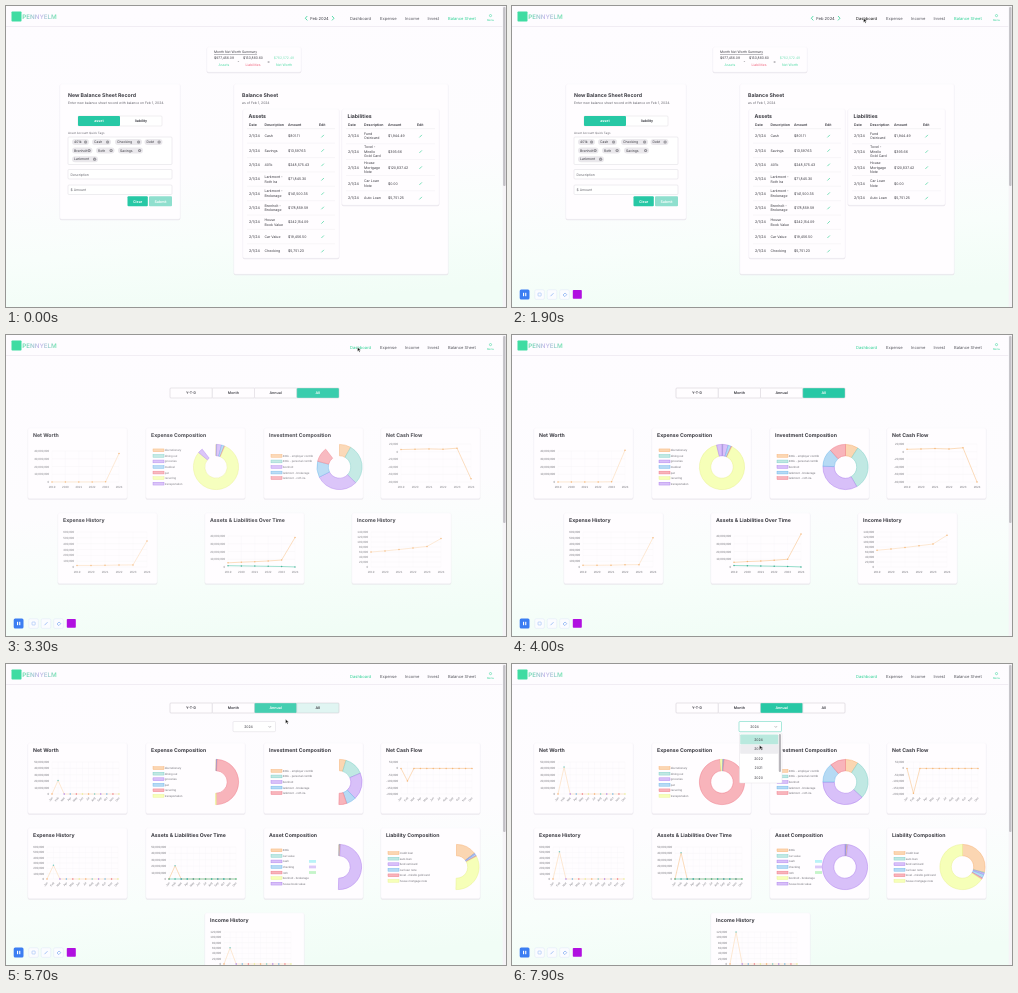
An HTML page that plays this animation: 500x301 px, repeating every 8000 ms.

```html
<!DOCTYPE html>
<html lang="en">
<head>
<meta charset="utf-8">
<title>Budget dashboard</title>
<style>
html, body { margin: 0; width: 100%; height: 100%; overflow: hidden; background: #fdfbfe; }
svg { display: block; width: 500px; height: 301px; }
text { font-family: Inter, sans-serif; text-rendering: geometricPrecision; white-space: pre; }
.tick { font-family: "Liberation Sans", sans-serif; }
</style>
</head>
<body>
<svg viewBox="0 0 500 301">
  <defs>
    <linearGradient id="bg" x1="0.35" y1="0" x2="0.5" y2="1">
      <stop offset="0" stop-color="#fefcff"/><stop offset=".55" stop-color="#fdfcfe"/>
      <stop offset=".78" stop-color="#f8fefb"/><stop offset="1" stop-color="#f1fdf6"/>
    </linearGradient>
    <linearGradient id="word">
      <stop offset="0" stop-color="#58dfa4"/><stop offset=".5" stop-color="#cdb8ee"/>
      <stop offset="1" stop-color="#6fe5ae"/>
    </linearGradient>
  </defs>
  <rect width="500" height="301" fill="url(#bg)"/>
  <g id="sheet"></g>
  <g id="all"><g></g><g></g></g>
  <g id="year"><g></g><g></g></g>
  <g id="head"></g>
  <g id="tools"></g>
  <g id="top"></g>
</svg>
<script>
const LOOP = 8000, TEAL = '#27c8a5', GREEN = '#2fd295', INK = '#3b3b42';
const MONTHS = 'Jan Feb Mar Apr May Jun Jul Aug Sep Oct Nov Dec'.split(' ');
const YEARS = [2019, 2020, 2021, 2022, 2023, 2024];
// each colour: fill, outline
const PALETTE = {
  o: ['#fbd6b2', '#f7ab68'], t: ['#c0e8e3', '#74cbc3'], p: ['#d8c0f9', '#a878ea'],
  b: ['#b6daf4', '#62b1e8'], r: ['#f8b4bb', '#ee7080'], y: ['#f6ffb8', '#e6f08a']
};
const $ = id => document.getElementById(id);
const clamp = v => Math.max(0, Math.min(1, v));
const ramp = (t, from, to) => clamp((t - from) / (to - from));
const easeOut = p => 1 - (1 - p) ** 4;

const text = (x, y, s, size = 3.4, fill = INK, more = '') =>
  `<text x="${x}" y="${y}" font-size="${size}" fill="${fill}" ${more}>${s}</text>`;
const mid = (x, y, s, size, fill, more = '') => text(x, y, s, size, fill, 'text-anchor="middle" ' + more);
const bold = (x, y, s, size = 5.2) => text(x, y, s, size, INK, 'font-weight="700"');
const rect = (x, y, w, h, fill, r = 0, stroke = 'none', more = '') =>
  `<rect x="${x}" y="${y}" width="${w}" height="${h}" rx="${r}" fill="${fill}" stroke="${stroke}" stroke-width=".4" ${more}/>`;
const path = (d, stroke, w = .5, fill = 'none') =>
  `<path d="${d}" stroke="${stroke}" stroke-width="${w}" fill="${fill}" stroke-linejoin="round"/>`;
const card = (x, y, w, h) =>
  rect(x - .3, y + .5, w + .6, h + .7, '#e6e2e9', 1.6, 'none', 'opacity=".75"') + rect(x, y, w, h, '#fffdff', 1.4, '#f4f1f6');

// ---- balance sheet page ----
function table(x, w, h, title, rows, cols) {
  const [desc, amount, edit] = cols;
  let s = card(x, 103, w, h) + bold(x + 5.5, 112, title);
  [['Date', x + 6], ['Description', desc], ['Amount', amount], ['Edit', edit]]
    .forEach(([label, cx]) => s += text(cx, 120, label, 3.5, INK, 'font-weight="600"'));
  s += path(`M${x + 4} 122.7h${w - 8}`, '#e6e3e9', .4);
  rows.forEach(([y, name, sum], i) => {
    const lines = name.split('|');
    s += text(x + 6, y + 1.2, '2/1/24', 3.6) + text(amount, y + 1.2, '$' + sum, 3.5);
    lines.forEach((l, k) => s += text(desc, y + 1.2 + (k - (lines.length - 1) / 2) * 4.5, l, 3.5));
    s += path(`M${edit + 2.4} ${y + 1.4}l2.5 -2.5`, '#55d8a6', .8);
    if (rows[i + 1]) s += path(`M${x + 4} ${(y + rows[i + 1][0]) / 2}h${w - 8}`, '#eeebf0', .4);
  });
  return s;
}

function sheetPage() {
  let s = path('M301.3 10l-2 2.2 2 2.2M326 10l2 2.2 -2 2.2', GREEN, .8) + mid(313.5, 13.6, 'Feb 2024', 4.1, INK);
  s += card(201, 41, 94, 25) + text(208, 47.2, 'Month Net Worth Summary', 3.35, INK, 'text-decoration="underline"');
  [[218, '$977,456.09', 'Assets', INK, '#4fdba5'], [247, '$133,883.60', 'Liabilities', INK, '#f0647c'],
   [278, '$782,572.49', 'Net Worth', '#7fe3bb', '#4fdba5']].forEach(([x, sum, label, c1, c2]) =>
    s += mid(x, 53.2, sum, 3.4, c1) + mid(x, 59.8, label, 3.4, c2));
  s += mid(232.3, 57, '-', 4, INK) + mid(262.5, 57, '=', 4, INK);

  s += card(54, 78, 120, 135) + bold(62, 91.2, 'New Balance Sheet Record');
  s += text(62, 97.8, 'Enter new balance sheet record with balance on Feb 1, 2024.', 3.35, '#66666e');
  s += rect(72, 110, 84, 10, '#fff', 1, '#d9d6dc') + rect(72, 110, 42, 10, TEAL, 1);
  s += mid(93, 116.3, 'asset', 3.6, '#fff', 'font-weight="600"') + mid(135, 116.3, 'liability', 3.6, INK, 'font-weight="600"');
  s += text(62, 128.3, 'Asset Account Quick Tags', 2.95, '#66666e') + rect(62, 131, 104, 27.5, '#fff', 1, '#d5d2d8');
  [[66, 136, 17, '401k'], [86, 136, 19, 'Cash'], [109, 136, 27, 'Checking'], [138.5, 136, 18, 'Debt'],
   [66, 144.5, 20.5, 'Brenholt'], [90, 144.5, 18.5, 'Roth'], [112, 144.5, 25, 'Savings'], [66, 153.2, 26, 'Larkmont']]
    .forEach(([x, y, w, tag]) => {
      const cx = x + w - 3.4;
      s += rect(x, y - 3, w, 6, '#eae8ec', 3) + text(x + 2, y + 1.2, tag, 3.4);
      s += `<circle cx="${cx}" cy="${y}" r="1.6" fill="#8d8b92"/>` + path(`M${cx - .6} ${y - .6}l1.2 1.2m0 -1.2l-1.2 1.2`, '#fff', .4);
    });
  s += rect(62, 163.5, 104, 9.5, '#fff', 1, '#d5d2d8') + text(64.5, 169.5, 'Description', 3.4, '#66666e');
  s += rect(62, 179, 104, 9.5, '#fff', 1, '#d5d2d8') + text(64.5, 185, '$ Amount', 3.4, '#66666e');
  s += rect(121.5, 190.3, 20.3, 10, TEAL, 1) + mid(131.6, 196.6, 'Clear', 3.6, '#fff', 'font-weight="600"');
  s += rect(143, 190.3, 23, 10, '#8fdfce', 1) + mid(154.5, 196.6, 'Submit', 3.6, '#fff', 'font-weight="600"');

  s += card(228, 78, 214, 190) + bold(236, 91.2, 'Balance Sheet') + text(236, 97.8, 'as of Feb 1, 2024', 3.4, '#66666e');
  const assets = [['Cash', '801.11'], ['Savings', '13,597.63'], ['401k', '248,575.43'], ['Larkmont -|Roth Ira', '71,845.30'],
    ['Larkmont -|Brokerage', '141,500.35'], ['Brenholt -|Brokerage', '178,859.59'], ['House|Book Value', '242,154.09'],
    ['Car Value', '19,456.50'], ['Checking', '5,751.23']].map((r, i) => [130 + i * 14.37, ...r]);
  s += table(237, 96, 149, 'Assets', assets, [258.5, 282, 313]);
  s += table(336, 97, 96, 'Liabilities', [[130, 'Fund|Ostricard', '1,944.49'], [145.5, 'Tovel -|Mirello|Gold Card', '393.66'],
    [161.5, 'House|Mortgage|Note', '120,837.42'], [177.5, 'Car Loan|Note', '0.00'], [192, 'Auto Loan', '5,751.25']], [358, 382, 411]);
  return s;
}

// ---- charts ----
const line = (x, y, title, [lo, hi, step], top, [x0, x1], ...series) => ({ x, y, title, lo, hi, step, top, x0, x1, series });
const ring = (x, y, title, cx, parts) => ({ x, y, title, cx, parts });
const peak = v => MONTHS.map((m, i) => i === 1 ? v : 0);
const invest = [['o', '401k - employer contrib'], ['t', '401k - personal contrib'], ['p', 'brenholt'],
  ['b', 'larkmont - brokerage'], ['r', 'larkmont - roth ira']];
const withSizes = (parts, sizes) => parts.map((p, i) => [...p, sizes[i]]);

// money in thousands
const allCharts = [
  line(22, 93, 'Net Worth', [0, 4e4, 1e4], 23, [24, 91], [100, 100, 100, 100, 300, 41000]),
  ring(140, 93, 'Expense Composition', 70, [['o', 'discretionary', 1], ['t', 'dining out', 1], ['p', 'groceries', 14],
    ['b', 'medical', 8], ['r', 'pet', 2], ['y', 'recurring', 320], ['p', 'transportation', 14]]),
  ring(258, 93, 'Investment Composition', 75.5, withSizes(invest, [33, 117, 122, 46, 42])),
  line(375, 93, 'Net Cash Flow', [-80, 20, 20], 16, [20, 90], [6, 7, 8, 7, 10, -80]),
  line(52, 178, 'Expense History', [0, 600, 100], 19, [19, 89], [30, 30, 32, 38, 40, 500]),
  line(199, 178, 'Assets &amp; Liabilities Over Time', [0, 4e4, 1e4], 23, [23, 90],
    [6000, 7000, 7700, 8700, 10000, 42500], [1900, 1600, 1300, 1000, 700, 100]),
  line(346, 178, 'Income History', [0, 140, 20], 19, [19, 89], [67, 72, 78, 85, 92, 127])
];
const yearCharts = [
  line(22, 79, 'Net Worth', [0, 5e4, 1e4], 19, [24, 91], peak(42000)),
  ring(140, 79, 'Expense Composition', 70, [['o', 'discretionary', 2], ['t', 'dining out', 1], ['p', 'groceries', 1],
    ['b', 'pet', 1], ['r', 'recurring', 350], ['y', 'transportation', 5]]),
  ring(258, 79, 'Investment Composition', 75.5, withSizes(invest, [33, 100, 137, 50, 40])),
  line(375, 79, 'Net Cash Flow', [-200, 50, 50], 19, [20, 91], peak(-195)),
  line(22, 164, 'Expense History', [0, 600, 100], 19, [19, 90], peak(510)),
  line(140, 164, 'Assets &amp; Liabilities Over Time', [0, 5e4, 1e4], 19, [23, 90], peak(41000), peak(0)),
  ring(258, 164, 'Asset Composition', 75, [['o', '401k', 1], ['t', 'car value', 1], ['p', 'cash', 1], ['b', 'checking', 2],
    ['r', 'roth', 1], ['y', 'brenholt - brokerage', 1], ['p', 'house book value', 353]]),
  ring(375, 164, 'Liability Composition', 75.5, [['o', 'credit loan', 104], ['t', 'auto loan', 2], ['p', 'fund ostricard', 4],
    ['b', 'car loan note', 9], ['r', 'tovel - mirello gold card', 4], ['y', 'house mortgage note', 237]]),
  line(199, 249, 'Income History', [0, 120, 20], 19, [19, 86], peak(120))
];

// pixel geometry of a line chart
function scale(c) {
  const n = c.series[0].length, base = c.y + (n === 12 ? 51 : 54), top = c.y + c.top;
  return {
    n, base, top,
    px: i => c.x + c.x0 + i * (c.x1 - c.x0) / (n - 1),
    py: v => base - (v - c.lo) / (c.hi - c.lo) * (base - top)
  };
}

function frameOf(c) {
  let s = card(c.x, c.y, 99, 70.5) + bold(c.x + 5, c.y + 9.2, c.title);
  if (c.parts) {
    c.parts.forEach(([col, label], i) => {
      const y = c.y + 39 + (i - (c.parts.length - 1) / 2) * 5.55;
      s += rect(c.x + 7, y - 1.4, 11, 2.8, PALETTE[col][0], 0, PALETTE[col][1]);
      s += text(c.x + 18.8, y + 1, label, 2.9, '#6f6f76', 'class="tick"');
    });
    if (c.title === 'Asset Composition')
      ['#b9f3f7', '#dcc9f8', '#c5f4c9'].forEach((f, i) => s += rect(303, 196 + i * 5.55, 7, 2.8, f));
    return s;
  }
  const { n, base, top, px, py } = scale(c), tick = 'class="tick" text-anchor="end"';
  for (let v = c.lo; v <= c.hi; v += c.step) {
    s += path(`M${px(0)} ${py(v)}H${px(n - 1)}`, '#f0edf2', .3);
    s += text(px(0) - 2.8, py(v) + 1, (v * 1000).toLocaleString('en-US'), 3, '#77777d', tick);
  }
  for (let i = 0; i < n; i++) {
    const x = px(i);
    s += path(`M${x} ${top}V${base}`, '#f5f3f7', .3);
    s += n === 12
      ? text(x + 1, base + 4, MONTHS[i], 2.8, '#77777d', `${tick} transform="rotate(-50 ${x + 1} ${base + 4})"`)
      : mid(x, base + 6, YEARS[i], 3, '#77777d', 'class="tick"');
  }
  return s;
}

function dataOf(c, p) {
  if (p <= 0) return '';
  let s = '';
  if (c.parts) {
    const cx = c.x + c.cx, cy = c.y + 39, R = 22.6, r = 11.2;
    const at = (a, rad) => `${cx + rad * Math.sin(a)} ${cy - rad * Math.cos(a)}`;
    let a = 0;
    for (const [col, , deg] of c.parts) {
      const b = a + deg * p * Math.PI / 180, big = +(b - a > Math.PI);
      s += path(`M${at(a, R)}A${R} ${R} 0 ${big} 1 ${at(b, R)}L${at(b, r)}A${r} ${r} 0 ${big} 0 ${at(a, r)}Z`,
        PALETTE[col][1], .45, PALETTE[col][0]);
      a = b;
    }
    return s;
  }
  const { px, py } = scale(c), strong = c.series[1] || c.lo < 0, hues = Object.values(PALETTE);
  c.series.forEach((vals, k) => {
    const color = k ? '#4fc9a9' : strong ? '#f9c48d' : '#fbdab5';
    s += path('M' + vals.map((v, i) => `${px(i)} ${py(v * p)}`).join('L'), color, .6);
    vals.forEach((v, i) => {
      const dot = k ? '#3fae93' : vals.length === 12 && c.lo === 0 ? hues[i % 6][1] : '#f5b779';
      s += `<circle cx="${px(i)}" cy="${py(v * p)}" r=".75" fill="${dot}"/>`;
    });
  });
  return s;
}

// period switch; on = strength of the green for each cell
function segments(y, on) {
  let s = rect(164, y, 169, 10, '#fffdff', 1, '#d9d5dc');
  ['Y-T-D', 'Month', 'Annual', 'All'].forEach((label, i) => {
    const x = 164 + i * 42.25;
    s += rect(x, y, 42.25, 10, TEAL, 1, '#d9d5dc', `fill-opacity="${on[i]}"`);
    s += mid(x + 21.1, y + 6.3, label, 3.6, on[i] > .5 ? '#fff' : INK, 'font-weight="600"');
  });
  return s;
}

function select(t) {
  const open = t >= 7400;
  let s = rect(227, 57.5, 42.5, 10.2, '#fff', 1, t >= 7300 ? TEAL : '#d5d2d8') + mid(242.5, 63.9, '2024', 3.5, INK);
  s += path('M262.6 62.2l1.2 1.2 1.2 -1.2', '#77777d', .5);
  if (!open) return s;
  s += rect(227.5, 69, 42.5, 50, '#fff', 1, '#dedbe1') + rect(228.2, 70.5, 38, 10, '#b9e9de', .8);
  if (cursorAt(t)[1] > 80) s += rect(228.2, 80.5, 38, 9.2, '#ededf0', .8);
  for (let i = 0; i < 5; i++) s += mid(246.5, 76.8 + i * 9.5, 2024 - i, 3.5, INK);
  return s + rect(266.8, 70, 2.2, 38, '#b9b7bc', 1);
}

// ---- header, toolbar, pointer ----
function header(t) {
  const onSheet = t < 2500;
  let s = path('M0 20.5H496.5', '#e9e5ec', .6) + rect(5.5, 5.5, 10, 10, '#3fdca2', .8);
  s += text(16.3, 13, 'PENNYELM', 6.2, 'url(#word)', 'font-weight="600"');
  [['Dashboard', 344], ['Expense', 374], ['Income', 399], ['Invest', 421.5], ['Balance Sheet', 442]].forEach(([label, x], i) => {
    const active = i === (onSheet ? 4 : 0), hover = i === 0 && onSheet && t > 1600;
    s += text(x, 13.7, label, 4.1, active ? GREEN : hover ? '#111' : '#55555c');
  });
  s += `<circle cx="484.5" cy="9.6" r="1.1" fill="none" stroke="${GREEN}" stroke-width=".5"/>` + mid(484.5, 14.6, 'Menu', 2.6, GREEN);
  const thumb = t < 2600 ? 179 : t < 5400 ? 187 : 167;
  return s + rect(496.6, 0, 3.4, 301, '#f6f4f7') + rect(497.1, 1, 2.4, thumb, '#c3c1c6', 1);
}

function toolbar() {
  let s = rect(7.7, 283.5, 9.8, 10, '#3b7df2', 1.5) + rect(11, 286.8, 1.1, 3.4, '#fff') + rect(13.2, 286.8, 1.1, 3.4, '#fff');
  [22.8, 35.2, 47.7].forEach(x => s += rect(x, 283.8, 9.6, 9.6, '#fbfcff', 1.4, '#d6e2f6'));
  s += rect(26, 287, 3.2, 3, 'none', .6, '#6c9cf0');
  s += path('M38.5 290.2l3 -3M51 289l2 -2 1.8 1.6 -2 2z', '#6c9cf0', .6);
  return s + rect(60.8, 284, 9, 8.8, '#b010e0', .8);
}

const TRAIL = [[800, 66, 288], [1650, 352, 14], [4400, 352, 14], [5200, 274, 58], [5500, 280, 57], [6300, 280, 57],
  [6500, 277, 58], [7150, 277, 58], [7350, 256, 63], [7450, 256, 63], [7800, 248, 83], [8000, 248, 83]];
function cursorAt(t) {
  const i = Math.max(1, TRAIL.findIndex(k => k[0] > t)), [a, ax, ay] = TRAIL[i - 1], [b, bx, by] = TRAIL[i];
  const p = ramp(t, a, b), e = p * p * (3 - 2 * p);
  return [ax + (bx - ax) * e, ay + (by - ay) * e];
}
function pointer(t) {
  if (t < 800 || t > 3500 && t < 4400) return '';
  const [x, y] = cursorAt(t);
  return path(`M${x - .5} ${y - 1.8}v4.4l1.1 -1 .7 1.6 .8 -.4 -.7 -1.5h1.5z`, '#fff', .4, '#111');
}

function show(id, opacity) {
  $(id).style.display = opacity > 0 ? '' : 'none';
  $(id).style.opacity = opacity;
}

$('sheet').innerHTML = sheetPage();
$('tools').innerHTML = toolbar();
$('all').firstChild.innerHTML = allCharts.map(frameOf).join('');
$('year').firstChild.innerHTML = yearCharts.map(frameOf).join('');

function draw() {
  const t = performance.now() % LOOP, annual = t >= 5400;
  const fill = easeOut(annual ? ramp(t, 5540, 6540) : ramp(t, 2870, 3870));
  show('sheet', 1 - ramp(t, 2550, 2720));
  show('all', annual ? 0 : ramp(t, 2800, 3350));
  show('year', +annual);
  show('tools', ramp(t, 100, 400));
  if (annual) {
    const swap = ramp(t, 5400, 5750);
    $('year').lastChild.innerHTML = yearCharts.map(c => dataOf(c, fill)).join('') + segments(39, [0, 0, swap, 1 - swap]) + select(t);
  } else if (t > 2700) {
    $('all').lastChild.innerHTML = allCharts.map(c => dataOf(c, fill)).join('') + segments(53, [0, 0, 0, 1]);
  }
  $('head').innerHTML = header(t);
  $('top').innerHTML = pointer(t);
  requestAnimationFrame(draw);
}
draw();
</script>
</body>
</html>
```
